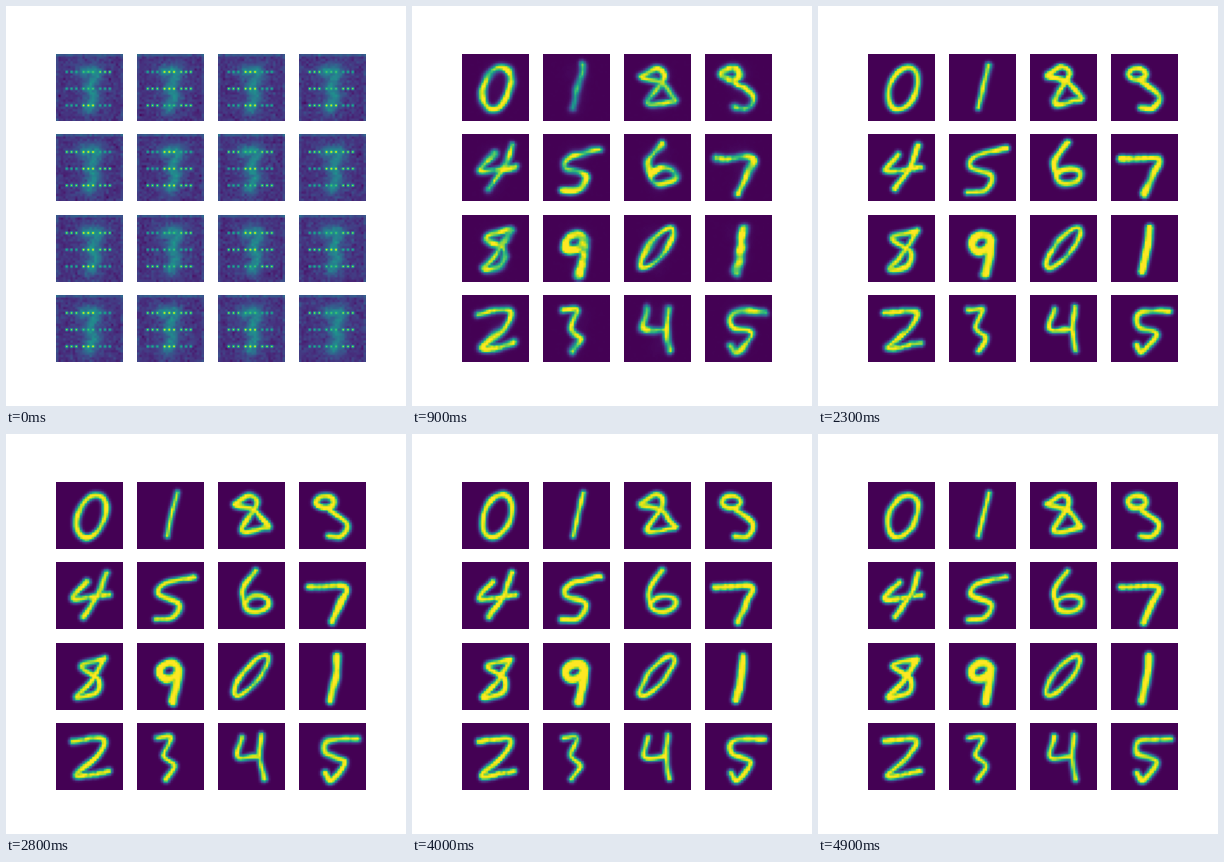
Write a matplotlib script that moves like this. It is 400 px wide and 400 px high and loops after 5200 ms.

```python
import numpy as np
import matplotlib.pyplot as plt
from matplotlib.animation import FuncAnimation

GRID = 28
TILE = 67          # strokes are laid out on a 67-unit square
FRAMES, LAST = 52, 49
YY, XX = np.mgrid[0:GRID, 0:GRID] + 0.5


def curve(*xy, steps=12):
    """Catmull-Rom curve through a few key points."""
    p = np.reshape(xy, (-1, 2)).astype(float)
    p = np.vstack([2 * p[0] - p[1], p, 2 * p[-1] - p[-2]])
    t = np.linspace(0, 1, steps)[:, None]
    return np.vstack([
        0.5 * (2 * b + (c - a) * t + (2 * a - 5 * b + 4 * c - d) * t**2
               + (3 * b - a - 3 * c + d) * t**3)
        for a, b, c, d in zip(p, p[1:], p[2:], p[3:])])


def loop(cx, cy, rx, ry, lean=0):
    """Closed oval whose top leans to the right."""
    t = np.linspace(0, 2 * np.pi, 60)
    return np.column_stack([cx + rx * np.cos(t) - lean * np.sin(t), cy + ry * np.sin(t)])


def glyph(*strokes, weight=1.25):
    return np.vstack(strokes) * GRID / TILE, weight


def distance(x, y, path):
    return np.sqrt(((x[..., None] - path[:, 0])**2
                    + (y[..., None] - path[:, 1])**2).min(axis=-1))


def waves(rng, scale):
    """Smooth random field, about -1 to 1."""
    kx, ky = rng.normal(0, scale, (2, 3, 1, 1))
    phase = rng.uniform(0, 2 * np.pi, (3, 1, 1))
    return np.sin(kx * XX + ky * YY + phase).sum(axis=0) / 2


glyphs = [
    glyph(loop(35, 34, 14, 21, 5)),
    glyph(curve(40, 11, 36, 28, 30, 54), weight=1.0),
    glyph(curve(17, 22, 32, 13, 39, 22, 24, 49, 50, 46), curve(18, 23, 37, 28, 51, 45)),
    glyph(loop(26, 20, 9, 6), curve(31, 28, 48, 42, 42, 54, 30, 54)),
    glyph(curve(31, 20, 18, 37, 53, 33), curve(50, 11, 42, 33, 27, 55)),
    glyph(curve(57, 15, 28, 22, 22, 33, 42, 42, 36, 56, 19, 58)),
    glyph(loop(39, 42, 12, 8, 2), curve(38, 9, 25, 27, 27, 45)),
    glyph(curve(10, 25, 46, 25, 42, 40, 33, 60), weight=1.4),
    glyph(curve(49, 16, 25, 23, 42, 36, 40, 50, 21, 54, 34, 40, 49, 16)),
    glyph(loop(32, 28, 9, 8, 2), curve(42, 26, 40, 42, 36, 59), weight=1.9),
    glyph(loop(33, 33, 10, 20, 14), weight=1.1),
    glyph(curve(38, 13, 37, 32, 31, 57), weight=1.7),
    glyph(curve(17, 18, 47, 16, 42, 32, 20, 53, 52, 48)),
    glyph(curve(20, 15, 34, 15, 27, 32, 37, 43, 29, 56), weight=1.1),
    glyph(curve(24, 14, 20, 34, 42, 34), curve(44, 12, 42, 34, 46, 56), weight=1.1),
    glyph(curve(59, 16, 29, 18, 27, 31, 46, 39, 32, 57, 26, 50)),
]
smear, _ = glyph(curve(28, 18, 40, 18, 34, 34, 38, 42, 33, 54))


def untrained(rng):
    """Noise, a vague smear and the dots left by strided layers."""
    d = distance(XX + rng.normal(0, 0.5), YY, smear)
    img = 0.14 + 0.26 * np.exp(-(d / 2.4)**2) + 0.07 * np.exp(-(d / 6)**2)
    img += rng.normal(0, 0.035, img.shape)
    img[0] += 0.12
    img[:, [0, -1]] += 0.06
    for row in (7, 14, 21):
        for start in (4, 11, 18):
            img[row, start:start + 5:2] = rng.choice([0.62, 0.85]) + 0.1 * (start == 11)
    return np.clip(img, 0, 1)


def trained(rng, n, path, weight):
    """Handwriting that settles as n grows: less warp, blur and breakup."""
    young, rough = np.exp(-n / 2.5), np.exp(-n / 10)
    warp = 0.2 + 0.7 * rough
    x = XX + warp * waves(rng, 0.3)
    y = YY + warp * waves(rng, 0.3)
    width = weight + (0.15 + 0.4 * rough) * waves(rng, 0.5)
    soft = 0.34 + 0.12 * rough + young
    ink = 1.12 / (1 + np.exp((distance(x, y, path) - width) / soft))
    ink *= 1 + (0.06 + 0.4 * rough) * waves(rng, 0.6)
    haze = 0.6 * np.exp(-(distance(x, y, smear) / 3.5)**2)
    haze += rng.normal(0.08, 0.06, haze.shape)
    return np.clip((1 - young) * ink + young * haze, 0, 1)


fig, axes = plt.subplots(4, 4, figsize=(4, 4), dpi=100)
images = []
for ax in axes.flat:
    ax.axis("off")
    images.append(ax.imshow(np.zeros((GRID, GRID)), cmap="viridis", vmin=0, vmax=1))


def update(i):
    n = min(i, LAST)
    for j, (image, (path, weight)) in enumerate(zip(images, glyphs)):
        rng = np.random.default_rng(100 * n + j)
        image.set_data(trained(rng, n, path, weight) if n else untrained(rng))
    return images


anim = FuncAnimation(fig, update, frames=FRAMES, interval=100, repeat=True, repeat_delay=0)
plt.show()
```
